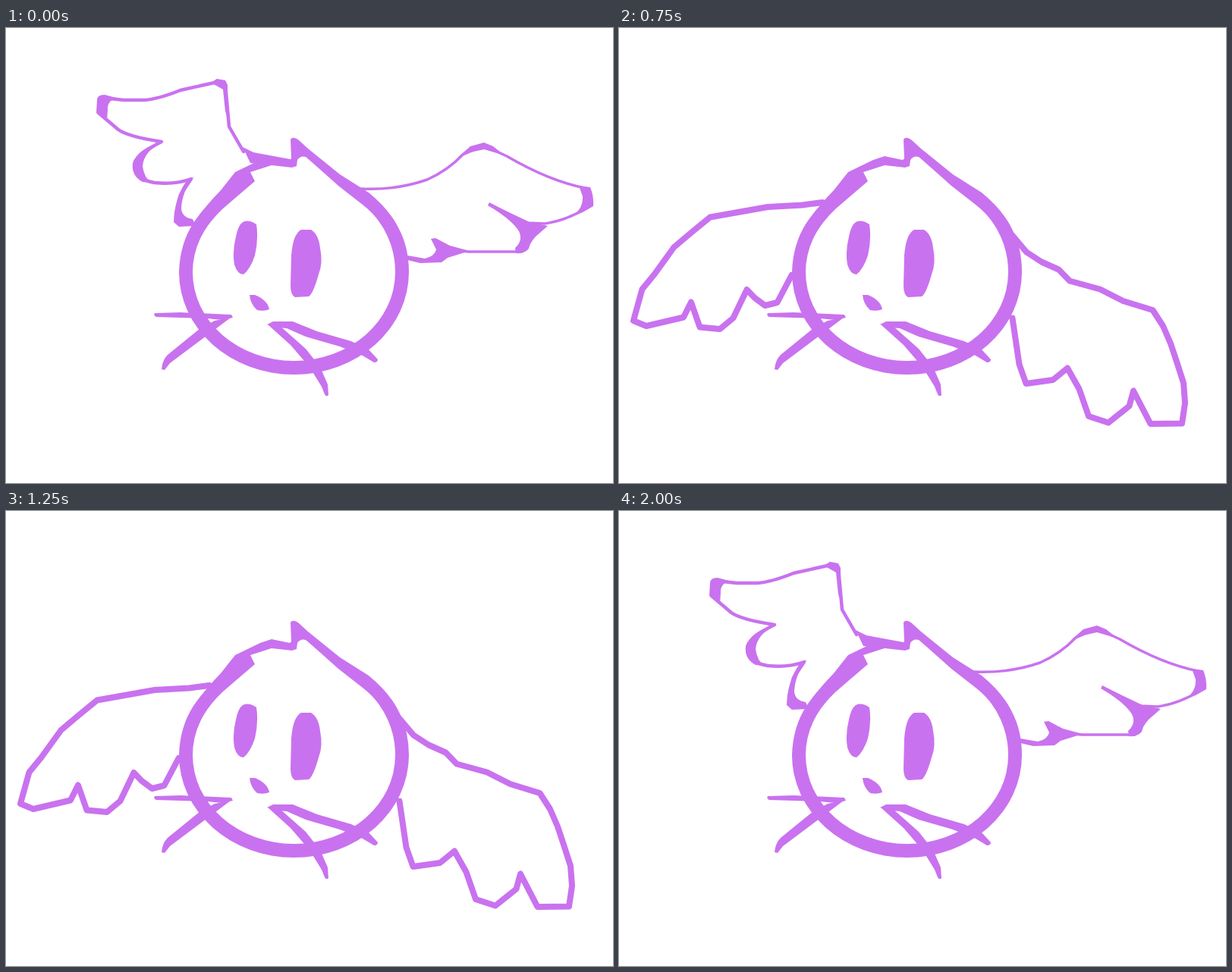
Recreate the animation shown at these times as an HTML page. Size 800 by 600 pixels, loop 2250 ms.

```html
<!DOCTYPE html>
<html lang="en">
<head>
<meta charset="utf-8">
<title>Flapping head</title>
<style>
html, body { margin: 0; width: 100%; height: 100%; overflow: hidden; background: #fff; }
svg { display: block; width: 800px; height: 600px; }
path { fill: #c972ef; }
.line { fill: none; stroke: #c972ef; stroke-width: 8; stroke-linecap: round; stroke-linejoin: round; }
.thin { stroke-width: 4.5; }
.pose { visibility: hidden; }
</style>
</head>
<body>
<svg viewBox="0 0 800 600">
  <g id="wings">
    <g class="pose">
      <path class="line thin" d="M313 163L294 130L290 85L289 76L275 72L230 82Q200 94 182 95L155 95L128 92L122 112L148 134Q160 143 205 150Q173 165 170 188Q176 201 196 204Q222 207 244 199L230 220L224 245L227 258L247 258"/>
      <path d="M120 95Q120 88 130 88L145 92Q133 97 134 108L133 122L119 112Z"/>
      <path d="M270 72L278 67L289 69L292 75L292 100L296 131L289 110L286 81Z"/>
      <path d="M206 151Q182 162 180 182Q182 198 192 204L180 203Q165 195 167 178Q173 160 206 149Z"/>
      <path d="M248 196Q232 215 231 238Q232 250 246 252L250 261L228 262L221 256Q222 225 237 203Z"/>
      <path d="M312 157L326 164L380 174L345 181L322 178Z"/>
      <path class="line thin" style="stroke-width:3.5" d="M468 212Q515 214 555 200Q582 188 602 167L630 155L660 169Q718 203 768 212L771 234Q740 254 710 258L688 257L638 233M680 295L610 295L578 292"/>
      <path d="M637 230L668 246L690 256L714 261L698 275Q690 284 689 291Q683 298 672 297L671 290Q682 280 676 268Q666 252 635 234Z"/>
      <path d="M560 278L566 277L585 287L611 294L582 303L574 309L546 310L529 306L529 300L552 304Q565 301 567 292Z"/>
      <path d="M755 208L770 210Q775 222 774 235L760 243L748 247Q761 237 760 222Z"/>
      <path d="M596 170L612 156L630 151L642 156L657 168L630 160L612 164Z"/>
    </g>
  </g>
  <path fill-rule="evenodd" d="M228 322Q229 285 247 257Q260 238 283 214L302 190L335 174L350 169L374 174L376 172L375 147Q378 142 386 148L398 159L440 193L478 217Q506 240 518 265Q531 290 531 322A151.5 135 0 0 1 228 322ZM246 322A133.5 117 0 0 0 513 322Q513 297 503 275Q492 250 470 233L438 208Q400 174 395 170Q388 168 384 174L383 182L377 184L350 181L322 190L328 202L300 226L285 239Q246 276 246 322Z"/>
  <path d="M312 256Q320 252 330 259Q333 278 328 300Q322 318 313 325Q305 325 301 312Q298 295 303 275Q306 260 312 256Z"/>
  <path d="M389 266L402 266Q412 272 414 290Q418 310 412 325Q405 350 399 354L381 355Q375 352 375 340L376 300Q378 272 389 266Z"/>
  <path d="M321 352L328 352Q345 359 347 371Q340 374 331 372Q322 364 321 352Z"/>
  <path d="M196 376L230 375L297 378L299 382L285 385L265 383L198 381Q194 379 196 376Z"/>
  <path d="M296 382L272 400L240 424L216 442L209 451L205 450Q206 438 213 431L256 396L275 386Z"/>
  <path d="M344 391L352 387L378 387L410 400L455 413L478 424L490 437Q490 441 485 441L470 432L440 420L395 407L370 396L358 395Z"/>
  <path d="M345 391L360 392L395 423L414 447L424 470L425 484Q422 487 420 483L416 473L400 447L375 418Z"/>
</svg>
<script>
const STEP = 250;
const ORDER = [0, 1, 2, 3, 4, 3, 2, 1, 0];
const wings = document.getElementById("wings");

const raised = [
  [345,176, 305,161, 280,135, 262,115, 250,94, 240,83, 220,84, 214,90, 195,94, 140,94, 127,92, 92,106, 86,119, 87,130, 125,149, 145,154, 163,154, 132,162, 131,177, 126,185, 126,197, 140,208, 160,218, 208,219, 213,216, 204,229, 203,255, 212,263, 222,263, 240,258, 262,245],
  [480,224, 495,226, 525,226, 590,211, 635,187, 653,184, 685,211, 708,233, 740,247, 775,262, 781,275, 775,285, 745,294, 715,291, 708,289, 714,302, 725,318, 730,340, 730,351, 682,355, 660,337, 630,316, 608,307, 607,335, 600,341, 560,341, 540,336, 531,328]
];

// Level and lowered wings share their point order, so they can be blended.
const level = [
  [286,213, 245,210, 197,202, 135,183, 110,197, 88,219, 46,252, 25,261, 12,290, 18,300, 80,302, 87,295, 88,328, 118,332, 133,325, 156,306, 164,324, 178,340, 198,341, 227,310],
  [515,262, 534,271, 556,277, 575,286, 590,296, 640,305, 675,311, 709,316, 720,338, 733,360, 742,388, 754,428, 753,444, 743,463, 703,463, 686,438, 679,458, 645,490, 620,472, 608,438, 590,407, 584,424, 547,429, 541,407, 523,375]
];
const lowered = [
  [250,247, 238,257, 195,270, 105,316, 80,343, 57,359, 47,398, 36,428, 26,462, 26,482, 54,486, 90,461, 103,428, 125,461, 148,462, 168,440, 181,384, 207,392, 219,383, 228,342],
  [522,285, 540,320, 558,340, 584,351, 598,371, 628,384, 654,409, 698,428, 714,448, 721,472, 727,489, 734,508, 739,545, 741,580, 698,581, 670,519, 666,539, 645,551, 618,552, 605,514, 592,490, 560,504, 526,509, 514,480, 514,390]
];
// Line the left feathers up: notch with notch, tip with tip.
lowered[0] = pick(lowered[0], [0,1,2,3,4,5,6,7,9,10,11,12,13,14,15,16,16.5,17,18,19]);

function pick(pts, at) {
  return at.flatMap(i => {
    const a = Math.floor(i) * 2, b = Math.ceil(i) * 2, k = i % 1;
    return [0, 1].map(c => pts[a + c] + (pts[b + c] - pts[a + c]) * k);
  });
}

function mix(a, b, k) {
  return a.map((wing, w) => wing.map((v, i) => v + (b[w][i] - v) * k));
}

function make(tag, parent, attrs) {
  const el = document.createElementNS("http://www.w3.org/2000/svg", tag);
  for (const key in attrs) el.setAttribute(key, attrs[key]);
  return parent.appendChild(el);
}

function addPose(pair) {
  const g = make("g", wings, { class: "pose" });
  for (const pts of pair) make("polyline", g, { class: "line", points: pts.join(" ") });
  return g;
}

const up = addPose(raised);
make("path", up, { d: "M522 222L560 209L608 198L636 184L632 193L606 213L570 222L524 231Z" });
make("path", up, { d: "M300 154L325 164L378 175L345 182L320 179L300 164Z" });
make("path", up, { d: "M256 118L262 116L282 142L274 140Z" });
addPose(level);
addPose(mix(level, lowered, 0.5));
addPose(lowered);

const poses = [...wings.children];
const start = performance.now();
let shown = -1;

function draw(now) {
  const t = Math.max(0, now - start) % (STEP * ORDER.length);
  const next = ORDER[Math.floor(t / STEP)];
  if (next !== shown) {
    poses.forEach((p, i) => p.style.visibility = i === next ? "visible" : "hidden");
    shown = next;
  }
  requestAnimationFrame(draw);
}
draw(start);
</script>
</body>
</html>
```
